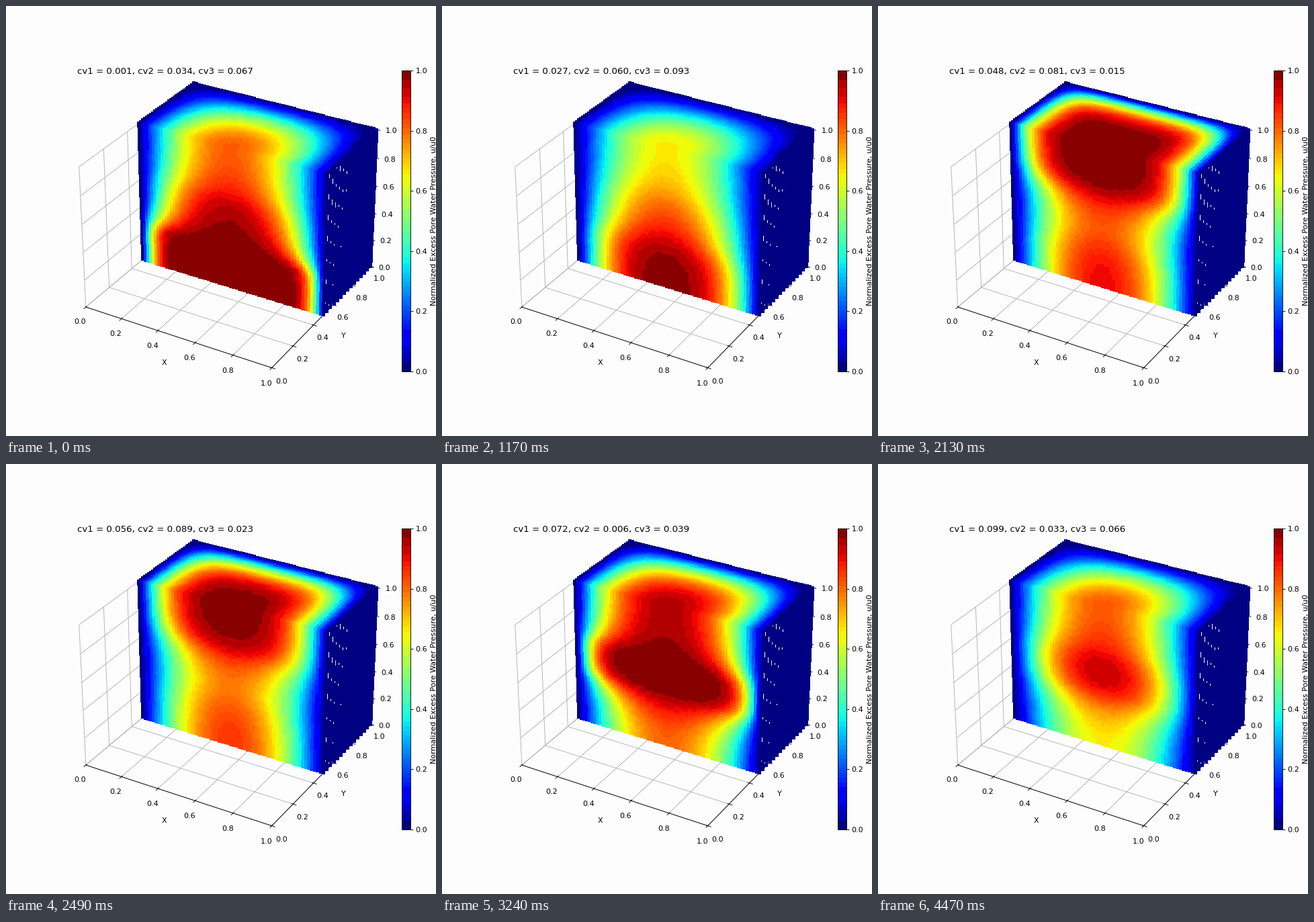
A matplotlib script that plays this animation: 640x640 px, repeating every 4.5 s.

```python
import numpy as np
import matplotlib.pyplot as plt
from matplotlib.animation import FuncAnimation
from matplotlib.colors import ListedColormap

FRAMES, INTERVAL = 150, 30
PAPER = "#fdfdfd"
NX, NY, NZ = 64, 28, 48
TIME, SQUARINGS = 0.5, 8
CV_MIN, CV_SPAN, CV_FLOOR = 0.001, 0.099, 0.005


def banded_jet():
    """Jet with its colours merged into coarse RGB cells."""
    rgb = np.floor(plt.get_cmap("jet")(np.arange(256))[:, :3] * 255 + 0.5)
    cells = (rgb // [32, 16, 32]).astype(int)
    weight = np.ones(256)
    weight[0], weight[-1] = 60, 8
    out = np.empty_like(rgb)
    for i, cell in enumerate(cells):
        same = (cells == cell).all(axis=1)
        out[i] = np.average(rgb[same], axis=0, weights=weight[same])
    return ListedColormap(out / 255)


x = np.linspace(0, 1, NX + 1)
y = np.linspace(0.5, 1, NY + 1)
z = np.linspace(0, 1, NZ + 1)

# Sine modes across x and y; the drained sides hold u = 0.
modes = np.arange(1, 16, 2)
amp = 4 / (np.pi * modes)
sin_x = amp[:, None] * np.sin(np.pi * np.outer(modes, x))
sin_y = amp[:, None] * np.sin(np.pi * np.outer(modes, y))
k2 = np.pi**2 * (modes[:, None] ** 2 + modes**2).ravel()

# Second derivative in z with closed ends.
eye = np.eye(NZ + 1)
lap = np.eye(NZ + 1, k=1) + np.eye(NZ + 1, k=-1) - 2 * eye
lap[0, 1] = lap[-1, -2] = 2
lap *= NZ**2


def layer_cvs(i):
    return [CV_MIN + CV_SPAN * ((i + 50 * k) % FRAMES) / FRAMES for k in range(3)]


def pressure(cvs):
    """Pressure on the cut face y = 0.5 and on the top face z = 1."""
    c1, c2, c3 = np.hypot(cvs, CV_FLOOR)

    def rise(level):
        return 0.5 + 0.5 * np.tanh((z - level) / 0.025)

    cv = c1 + (c2 - c1) * rise(1 / 3) + (c3 - c2) * rise(2 / 3)
    dt = TIME / 2**SQUARINGS
    rate = cv[:, None] * (lap - k2[:, None, None] * eye)
    step = np.linalg.inv(eye - dt * rate)
    for _ in range(SQUARINGS):
        step = step @ step
    w = step.sum(axis=2).reshape(len(modes), len(modes), -1)
    front = sin_x.T @ np.einsum("n,mnz->mz", sin_y[:, 0], w)
    top = sin_x.T @ w[:, :, -1] @ sin_y
    return front, top


def face(*axes):
    return [g.ravel() for g in np.meshgrid(*axes, indexing="ij")]


fig = plt.figure(figsize=(8, 8), dpi=80, facecolor=PAPER)
ax = fig.add_subplot(111, projection="3d", facecolor=PAPER)
ax.set(xlim=(0, 1), ylim=(0, 1), zlim=(0, 1), xlabel="X", ylabel="Y")
for axis in (ax.xaxis, ax.yaxis, ax.zaxis):
    axis.set_pane_color((1, 1, 1, 0))

faces = [face(x, [0.5], z), face(x, y, [1]), face([1], y[::2], z)]
points = np.hstack([np.array(f) for f in faces])
side = np.zeros(len(faces[2][0]))

block = ax.scatter(*points, c=np.zeros(points.shape[1]), cmap=banded_jet(),
                   vmin=0, vmax=1, marker="s", s=20, linewidths=0,
                   depthshade=False)
bar = fig.colorbar(block, cax=fig.add_axes([0.92, 0.15, 0.02, 0.7]))
bar.set_label("Normalized Excess Pore Water Pressure, u/u0")
title = ax.text2D(0.05, 0.95, "", transform=ax.transAxes, fontsize=12)


def update(i):
    cvs = layer_cvs(i)
    front, top = pressure(cvs)
    u = np.concatenate([front.ravel(), top.ravel(), side])
    block.set_array(np.clip(u, 0, 1))
    title.set_text(", ".join(f"cv{k} = {cv:.3f}" for k, cv in enumerate(cvs, 1)))
    return block, title


anim = FuncAnimation(fig, update, frames=FRAMES, interval=INTERVAL,
                     repeat=True, repeat_delay=0)
plt.show()
```
